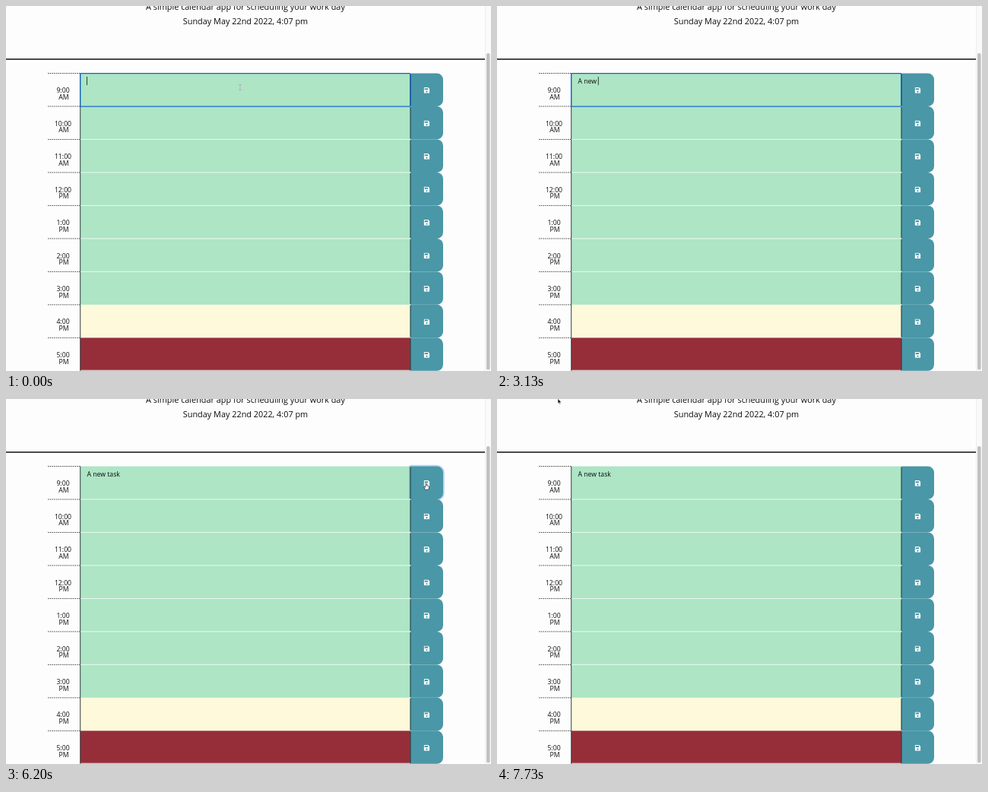
An HTML page for the animation above (8 s loop, 638 by 480 pixels).

```html
<!DOCTYPE html>
<html lang="en">
<head>
<meta charset="utf-8">
<title>Work Day Scheduler</title>
<style>
  html, body { margin: 0; width: 100%; height: 100%; overflow: hidden; background: #fdfdfd; }
  svg { display: block; width: 638px; height: 480px; }
  text { font-family: "Open Sans", sans-serif; fill: #0c0c0c; white-space: pre; }
  .bare text { font-family: "Liberation Sans", Arial, sans-serif; }
  .mid { text-anchor: middle; }
  .small { font-size: 8.7px; }
  .lead { font-size: 10.87px; }
  .bare .lead { font-size: 11.05px; fill: #222; }
  .title { font-size: 21.7px; }
  .dash { stroke: #222; stroke-width: .8; stroke-dasharray: 1.63 1.09; }
  .edge { stroke: #1c2a2c; stroke-width: .9; }
  .btn { fill: #4a97a7; }
  .gap { stroke: #e9f8ef; stroke-width: 1; }
  .focus { fill: none; stroke: #0d62c4; stroke-width: 1.25; }
  .ring { fill: none; stroke: #007bff; stroke-opacity: .3; stroke-width: 3.5; }
  .caret { stroke: #111; stroke-width: .8; }
</style>
</head>
<body>
<svg viewBox="0 0 638 480">
  <defs>
    <symbol id="disk" viewBox="0 0 448 448">
      <path fill="#fff" fill-rule="evenodd" d="M48 0H314Q334 0 348 14L434 100Q448 114 448 134V400Q448 448 400 448H48Q0 448 0 400V48Q0 0 48 0Z
        M64 64V184H320V64Z M224 256a64 64 0 1 0 .1 0Z"/>
    </symbol>
  </defs>
  <g id="ready"></g>
  <g id="bare" class="bare"></g>
  <g id="beam" fill="none">
    <path d="M-1.6 -3.6Q0 -3.6 0 -2.6Q0 -3.6 1.6 -3.6M0 -2.6V2.6M-1.6 3.6Q0 3.6 0 2.6Q0 3.6 1.6 3.6" stroke="#fff" stroke-width="1.5" opacity=".75"/>
    <path d="M-1.6 -3.6Q0 -3.6 0 -2.6Q0 -3.6 1.6 -3.6M0 -2.6V2.6M-1.6 3.6Q0 3.6 0 2.6Q0 3.6 1.6 3.6" stroke="#667" stroke-width=".6"/>
  </g>
  <path id="arrow" d="M0 0V6.6L1.5 5.3L2.5 7.5L3.6 7L2.6 4.9L4.7 4.7Z" fill="#111" stroke="#fff" stroke-width=".6"/>
  <path id="hand" d="M-.7 0Q0 -.8 .7 0V2.6L3.4 3.3Q4.2 3.6 4 4.8L3.3 8H-.8L-2.9 4.8Q-2.6 3.8 -.7 5Z" fill="#fff" stroke="#111" stroke-width=".6"/>
</svg>
<script>
const LOOP = 8000, PITCH = 43.48, STEP = 1000 / 15;
const TASK = "A new task", TEXT_X = 106.5;
const $ = id => document.getElementById(id);

const keyTimes = [2400, 2600, 2860, 2930, 3060, 3130, 3730, 3860, 4000, 4200];
const caretFlips = [60, 460, 1000, 1460, 2000, 2400, 3660, 3730, 4730, 5260, 5790];
const HIDE = 1330, SHOW = 4660, CLICK = 5930, RELOAD = 7660, LOADED = 7730;
// time, x, y
const path = [
  [4660, 308, 107], [4860, 400, 85], [5060, 560, 50], [5200, 594, 46], [5330, 566, 94],
  [5460, 532.5, 120.5], [5600, 544, 116], [5800, 551, 112], [6330, 553, 111],
  [6400, 540, 106], [6730, 320, 46], [7060, 80, -.5]
];

const line = (cls, x1, y1, x2, y2) =>
  `<line class="${cls}" x1="${x1}" y1="${y1}" x2="${x2}" y2="${y2}"/>`;
const label = (cls, x, y, s, id = "") =>
  `<text id="${id}" class="${cls}" x="${x}" y="${y}">${s}</text>`;
const rect = (x, y, w, h, fill, r = 0) =>
  `<rect x="${x}" y="${y}" width="${w}" height="${h}" fill="${fill}" rx="${r}"/>`;
const buttonPath = y =>
  `M533 ${y}H566.8a8.2 8.2 0 0 1 8.2 8.2V${y + PITCH - 8.2}a8.2 8.2 0 0 1 -8.2 8.2H533q-1.2 0 -1.2 -1.2V${y + 1.2}q0 -1.2 1.2 -1.2Z`;

function row(i, top, ready) {
  const y = top + i * PITCH, hour = (i + 8) % 12 + 1, half = i < 3 ? "AM" : "PM";
  const base = y + (ready ? 25.6 : 25.2);
  let s = line("dash", 55, y, 98, y)
    + label("mid small", 75, base, hour + ":00")
    + label("mid small", 76, base + 8.7, half);
  if (ready) {
    s += rect(98, y, 434, PITCH, i < 7 ? "#ade5c5" : i < 8 ? "#fff9db" : "#962e3a");
    if (i && i < 7) s += line("gap", 98, y, 531.5, y);
    if (i === 8) s += line("gap", 98, y + PITCH - .6, 531.5, y + PITCH - .6);
    if (!i) s += `<path id="ring" class="ring" d="${buttonPath(y)}"/>`;
  }
  s += `<path class="btn" d="${buttonPath(y)}"/>`
    + line("edge", 97.7, y, 97.7, y + PITCH)
    + line("edge", 532, y + 1, 532, y + PITCH - 1);
  if (ready) s += `<use href="#disk" x="549.6" y="${y + 18.6}" width="7.7" height="7.7"/>`;
  return s;
}

function page(top, thumbY, thumbH, ready) {
  let s = rect(0, top - 19.3, 630, 1.5, "#111");
  for (let i = 0; i < 9; i++) s += row(i, top, ready);
  return s + rect(630, 0, 8, 480, "#fafafa") + rect(630, 0, .6, 480, "#e4e4e4")
    + rect(632, thumbY, 4.6, thumbH, "#c1c1c1", 2.3);
}

$("ready").innerHTML = page(88.5, 62, 416.5, true)
  + label("mid lead", 315, 5, "A simple calendar app for scheduling your work day")
  + label("mid lead", 315, 24.4, "Sunday May 22nd 2022, 4:07 pm")
  + `<rect id="focus" class="focus" x="97.6" y="88.5" width="434.2" height="43.7" rx="1.2"/>`
  + label("small", TEXT_X, 101.5, "", "task")
  + `<line id="caret" class="caret" y1="93" y2="104"/>`;
$("bare").innerHTML = page(138.5, 1, 432, false)
  + label("mid title", 315, 55.6, "Work Day Scheduler")
  + label("mid lead", 315, 74, "A simple calendar app for scheduling your work day");

const pen = document.createElement("canvas").getContext("2d");
pen.font = '8.7px "Open Sans", sans-serif';

const show = (id, on) => $(id).setAttribute("visibility", on ? "visible" : "hidden");
const passed = (times, t) => times.filter(k => k <= t).length;

function pointer(t) {
  if (t < HIDE) return [308, 107];
  if (t < SHOW) return null;
  const q = Math.floor((t + 7) / STEP) * STEP;
  const n = path.findIndex(p => p[0] > q);
  if (n < 0) return path[path.length - 1].slice(1);
  if (!n) return path[0].slice(1);
  const a = path[n - 1], b = path[n], f = (q - a[0]) / (b[0] - a[0]);
  return [a[1] + (b[1] - a[1]) * f, a[2] + (b[2] - a[2]) * f];
}

function render(t) {
  const bare = t >= RELOAD && t < LOADED;
  const editing = t < CLICK;
  const typed = TASK.slice(0, passed(keyTimes, t));
  $("ready").style.display = bare ? "none" : "";
  $("bare").style.display = bare ? "" : "none";
  $("task").textContent = typed;
  show("focus", editing);
  show("ring", !editing && t < RELOAD);
  show("caret", editing && passed(caretFlips, t) % 2 === 0);
  const x = TEXT_X + pen.measureText(typed).width;
  $("caret").setAttribute("x1", x);
  $("caret").setAttribute("x2", x);

  const p = pointer(t);
  let kind = "";
  if (p) {
    const inRows = p[1] > 88 && p[0] > 98 && p[0] < 575;
    kind = !inRows ? "arrow" : p[0] < 534 ? "beam" : "hand";
    $(kind).setAttribute("transform", `translate(${p[0]} ${p[1]})`);
  }
  for (const id of ["beam", "arrow", "hand"]) show(id, id === kind);
}

const start = performance.now();
function tick() {
  render((performance.now() - start) % LOOP);
  requestAnimationFrame(tick);
}
tick();
</script>
</body>
</html>
```
